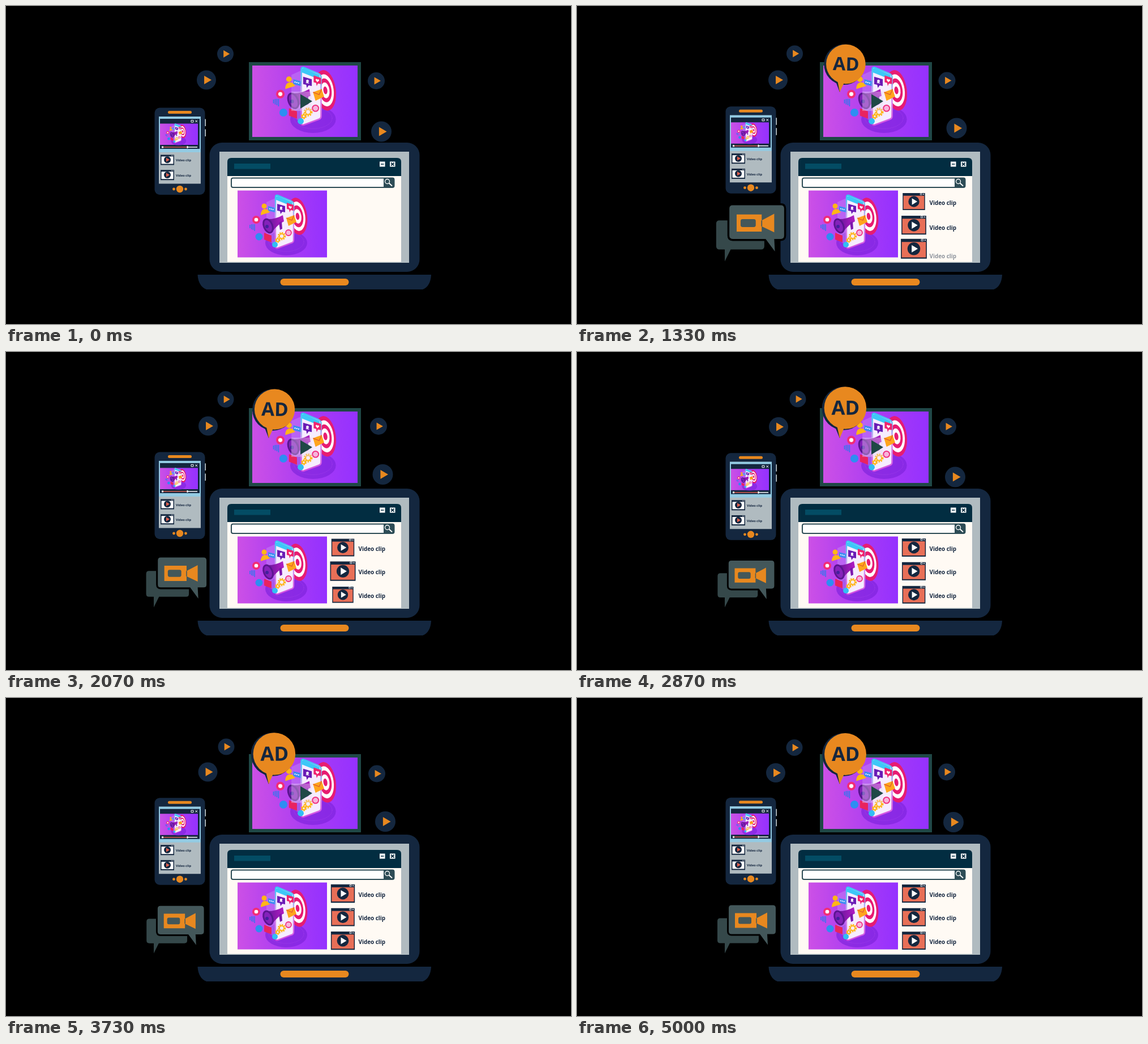
An HTML page for the animation above (5030 ms loop, 998x561 px).

```html
<!DOCTYPE html>
<html lang="en">
<head>
<meta charset="utf-8">
<title>Video advertising</title>
<style>
html, body { margin: 0; width: 100%; height: 100%; overflow: hidden; background: #000; }
svg { display: block; width: 100%; height: 100%; }
text { font-family: "Open Sans", "Noto Sans", sans-serif; font-weight: 700; fill: #14263f; }
.navy { fill: #14273f; }
.orange { fill: #e8881f; }
.gray { fill: #b0bbc0; }
</style>
</head>
<body>
<svg viewBox="0 0 998 561">
  <defs>
    <linearGradient id="violet"><stop stop-color="#cc50e6"/><stop offset=".5" stop-color="#ab3df2"/><stop offset="1" stop-color="#9531ff"/></linearGradient>
    <linearGradient id="cyanPink" x2="0" y2="1"><stop stop-color="#35c5f6"/><stop offset=".45" stop-color="#d6a6f2"/><stop offset="1" stop-color="#d44de0"/></linearGradient>
    <linearGradient id="horn" x2="1"><stop stop-color="#5d1696"/><stop offset="1" stop-color="#b41cc4"/></linearGradient>

    <g id="art">
      <ellipse cx="495" cy="418" rx="37" ry="22" fill="#7d22dc" opacity=".65"/>
      <ellipse cx="495" cy="416" rx="31" ry="17" fill="none" stroke="#b04cf0" stroke-width=".7" stroke-dasharray="1 1.5"/>
      <g id="rings" transform="translate(515 371) rotate(-8)"></g>
      <path d="M460 346L478 338V424L460 412Z" fill="#c48cf5" opacity=".45"/>
      <path d="M476 337q0-4 4-3l24 10q4 2 4 6v63q0 4-4 5l-24 9q-4 1-4-3z" fill="#f6ecff" stroke="url(#cyanPink)" stroke-width="2.4"/>
      <path d="M477 336l3-1 25 11 2 8-30-12z" fill="#3cc8f7"/>
      <path d="M479 349l14 4v11l-5-1-3 4-1-5-5-1z" fill="#6a1bb5"/>
      <circle cx="486" cy="356" r="2.2" fill="#fff"/>
      <path d="M483 359q3-3 6 1z" fill="#fff"/>
      <path d="M496 347l12 4v10l-5-1-2 4-1-5-4-1z" fill="#f0246f"/>
      <path d="M502 358l-3-4q2-3 3 0 2-2 3 1z" fill="#fff"/>
      <g fill="#ffb617">
        <circle cx="456" cy="353" r="4.5"/>
        <path d="M450 369q0-10 7-11 6 0 9 6z"/>
      </g>
      <path d="M463 353l12 3v8l-12-3z" fill="#3d8cf2"/>
      <path d="M465 357.5l8 2" stroke="#fff" stroke-width="1.8" stroke-dasharray="1.8 1.2"/>
      <path d="M495 374l14-5 4 12-14 7z" fill="#ffa51d"/>
      <path d="M495 374l10 4 4-9" fill="none" stroke="#e05b2f" stroke-width="1.2"/>
      <path d="M459 376Q475 377 489 369l2 11q-10 4-23 21z" fill="url(#horn)"/>
      <path d="M482 382l5-2 1 13-4 2z" fill="#7d17ad"/>
      <ellipse cx="463" cy="388" rx="9" ry="14" transform="rotate(-22 463 388)" fill="#5a1590"/>
      <ellipse cx="463" cy="388" rx="6" ry="11" transform="rotate(-22 463 388)" fill="#8421bb"/>
      <circle cx="461" cy="389" r="3" fill="#43209d"/>
      <g fill="none" stroke="#ffb617" stroke-dasharray="2.2 1.4">
        <circle cx="487" cy="406" r="5.5" stroke-width="3.4"/>
        <circle cx="480" cy="413" r="3.4" stroke-width="2.6"/>
      </g>
      <g fill="none" stroke="#ffb617" stroke-width="1.8"><circle cx="487" cy="406" r="4"/><circle cx="480" cy="413" r="2.4"/></g>
      <circle cx="499" cy="400" r="5" fill="#f7b4dc" stroke="#f0307f" stroke-width="1.8"/>
      <circle cx="442" cy="377" r="7" fill="#f22d75"/>
      <circle cx="442" cy="377" r="3.3" fill="#fff"/>
      <path d="M431 386v6m2.7-7v9m2.7-9v10m2.7-10v12" stroke="#2c78ee" stroke-width="1.5"/>
      <circle cx="447" cy="407" r="6.5" fill="#2d8ef2"/>
      <path d="M456 400l13 5v12l-13-5z" fill="#e9235f"/>
      <circle cx="475" cy="421" r="5" fill="#32bdf3"/>
    </g>

    <g id="clip">
      <path class="navy" d="M-21-16h42v32h-42z"/>
      <path d="M-19.5-11h39v25h-39z" fill="#e86f57"/>
      <path d="M12-15.2h3v2.6h-3zM17-15l2.4 2.4m0-2.4l-2.4 2.4" fill="none" stroke="#fff" stroke-width=".8"/>
      <circle class="navy" r="10.3"/>
      <path d="M-3.5-6L6.5 0-3.5 6z" fill="#fff"/>
    </g>

    <g id="row">
      <path class="navy" d="M273 262.500h24v18h-24z"/>
      <path d="M274.500 265.500h21v13h-21z" fill="#fff"/>
      <path d="M292 264h1.300m1.200 0h1.300" stroke="#fff"/>
      <circle class="navy" cx="285" cy="271.300" r="6"/>
      <path d="M283 267.800l6 3.500-6 3.500z" fill="#e2604e"/>
      <text x="300" y="274.500" font-size="5.6">Video clip</text>
    </g>
  </defs>

  <rect width="998" height="561"/>

  <!-- framed video -->
  <path d="M429 99h198v138H429z" fill="#1f4846"/>
  <path d="M435 105h186v126H435z" fill="url(#violet)"/>
  <use href="#art" transform="translate(490 188) scale(1.09) translate(-447 -407)"/>
  <path d="M504 151h36v34h-36z" fill="#e5d5ef" opacity=".38"/>
  <path d="M520 155.500L541 168 520 181z" fill="#1f4846"/>

  <!-- laptop -->
  <rect class="navy" x="359.500" y="241" width="371" height="228" rx="22"/>
  <path class="gray" d="M377 257h335v196H377z"/>
  <path d="M391 299h307v152.500H391z" fill="#fffaf4"/>
  <path d="M391 300v-25q0-7 7-7h293q7 0 7 7v25z" fill="#022d41"/>
  <path d="M403 278h64v9.500h-64z" fill="#034c64"/>
  <path d="M660 274.500h9.500v9H660zM678 274.500h9.500v9H678z" fill="#fff"/>
  <path d="M662 279h5.500M680 276.500l5.500 5m0-5l-5.500 5" stroke="#022d41" stroke-width="1.7"/>
  <rect x="398" y="303.500" width="287.500" height="16.500" rx="3" fill="#fff" stroke="#2d4c56" stroke-width="2"/>
  <path d="M667 303h16q3 0 3 3v11q0 3-3 3h-16z" fill="#2d4c56"/>
  <circle cx="673.500" cy="309.500" r="4" fill="none" stroke="#fff" stroke-width="1.3"/>
  <path d="M676.500 312.500l5.500 5" stroke="#fff" stroke-width="1.8"/>
  <path d="M409 325.500h158v118H409z" fill="url(#violet)"/>
  <use href="#art"/>
  <path class="navy" d="M338.500 474H751C750.500 487 745 497 736 500H354C345 497 339 487 338.500 474z"/>
  <rect class="orange" x="484.500" y="481" width="121" height="12" rx="6"/>
  <g id="list"></g>

  <!-- phone -->
  <g id="phone">
    <path d="M350 199.500h3v12.500h-3zm0 18h3v12.500h-3z" fill="#cbd3d5"/>
    <rect class="navy" x="262.500" y="179.500" width="89" height="153.500" rx="9"/>
    <rect class="orange" x="286" y="185" width="42" height="5" rx="2.500"/>
    <path class="gray" d="M270 195h74v118.500h-74z"/>
    <path d="M270 195h74v63h-74z" fill="#93cbe3"/>
    <path class="navy" d="M272 199h70v53h-70z"/>
    <path d="M272 207.500h67v37.500h-67z" fill="url(#violet)"/>
    <use href="#art" transform="translate(281 207.500) scale(.36) translate(-429 -333)"/>
    <path d="M327 201.500h4v3.500h-4zM334.500 201.500l3.500 3.500m0-3.500l-3.500 3.500" fill="none" stroke="#fff"/>
    <path d="M277 249h43" stroke="#d9604d" stroke-width="1.5"/>
    <path d="M320 249h18" stroke="#fff" stroke-width="1.5"/>
    <path d="M275 247.500h3v3h-3zM319.500 247h2v4h-2z" fill="#fff"/>
    <use href="#row"/>
    <use href="#row" y="26.700"/>
    <g class="orange"><circle cx="307" cy="323" r="6.200"/><circle cx="296.500" cy="323" r="2.400"/><circle cx="317.500" cy="323" r="2.400"/></g>
  </g>

  <g id="buttons"></g>

  <!-- AD bubble, origin at the tail tip -->
  <g id="ad">
    <g class="navy"><circle cx="7" cy="-52" r="38"/><path d="M-9-22L0 0l6-18z"/></g>
    <g class="orange"><circle cx="10" cy="-53" r="37"/><path d="M-5-23L0 0 8-18z"/></g>
    <text x="10.500" y="-41" font-size="34.500" text-anchor="middle">AD</text>
  </g>

  <!-- chat bubbles, origin at the rear tail tip -->
  <g id="chat">
    <path d="M-8-62H55q5 0 5 5v34q0 5-5 5H9L0 0V-18H-8q-5 0-5-5V-57q0-5 5-5z" fill="#35484a"/>
    <path d="M12-85H85q5 0 5 5v41q0 5-5 5H75L76-15 62-34H12q-5 0-5-5V-80q0-5 5-5z" fill="#43575a" stroke="#000" stroke-width="6" paint-order="stroke"/>
    <path class="orange" d="M18-71H56v9L75-72v28L56-53v8H18z"/>
    <path d="M56-62v9" stroke="#43575a" stroke-width="1.500"/>
    <rect x="24" y="-64" width="23" height="12" rx="3" fill="#43575a"/>
  </g>
</svg>
<script>
const LOOP = 5030;
const $ = id => document.getElementById(id);

function add(parent, tag, attrs, label = "") {
  const node = document.createElementNS("http://www.w3.org/2000/svg", tag);
  for (const key in attrs) node.setAttribute(key, attrs[key]);
  node.textContent = label;
  return parent.appendChild(node);
}

const place = (node, x, y, scale = 1, angle = 0) =>
  node.setAttribute("transform", `translate(${x} ${y}) rotate(${angle}) scale(${scale})`);

const clamp = v => Math.max(0, Math.min(1, v));

// Linear growth followed by a decaying overshoot.
function spring(age) {
  const rise = 330;
  if (age <= 0) return 0;
  if (age < rise) return age / rise;
  const t = age - rise;
  return 1 + .26 * Math.exp(-t / 970) * Math.sin(2 * Math.PI * t / 1000);
}

// Smooth drift through a few positions.
const times = [0, 730, 1330, 2070, 2870, 3730, 5000];
function drift(values, t) {
  const last = times.length - 1;
  let i = 0;
  while (i < last - 1 && t > times[i + 1]) i++;
  const slope = k => {
    const a = Math.max(0, k - 1), b = Math.min(last, k + 1);
    return (values[b] - values[a]) / (times[b] - times[a]);
  };
  const span = times[i + 1] - times[i];
  const u = clamp((t - times[i]) / span), v = 1 - u;
  return v * v * (1 + 2 * u) * values[i] + u * u * (3 - 2 * u) * values[i + 1]
    + span * u * v * (v * slope(i) - u * slope(i + 1));
}

[1, .79, .59, .39, .19].forEach((k, i) =>
  add($("rings"), "ellipse", { rx: 17 * k, ry: 33 * k, fill: i % 2 ? "#fff" : "#e71c72" }));

const phoneY = [0, -3.7, -2.3, -3, -1.2, -3.3, -3.8];

const buttons = [
  { r: 14.5, x: [387.5, 383, 384.5, 388, 390, 389, 384], y: [84.5, 83.5, 84, 83.5, 83, 86, 87.5] },
  { r: 17, x: [354, 353, 355, 357, 356, 356.5, 351], y: [130.5, 131.5, 130.5, 130.5, 132, 130.5, 132] },
  { r: 15, x: [654, 652.5, 653.5, 658, 655, 655, 653], y: [132, 134, 131.5, 131, 131.5, 133.5, 130.5] },
  { r: 18, x: [663, 665.5, 670.5, 665.5, 668, 670, 665], y: [221.5, 216.5, 215.5, 216, 220.5, 218, 219] }
];
for (const b of buttons) {
  b.node = add($("buttons"), "g");
  add(b.node, "circle", { r: b.r, class: "navy" });
  add(b.node, "path", { d: "M-.23-.44L.53 0-.23 .44z", class: "orange", transform: `scale(${b.r})` });
}

const items = [
  { y: 345, start: 100, textStart: 310 },
  { y: 386.7, start: 542, textStart: 830 },
  { y: 428.2, start: 940, textStart: 1110 }
];
for (const item of items) {
  item.thumb = add($("list"), "use", { href: "#clip" });
  item.label = add($("list"), "text", { x: 622.5, "font-size": 9.9 }, "Video clip");
}

function render(t) {
  place($("phone"), 0, drift(phoneY, t));
  for (const b of buttons) place(b.node, drift(b.x, t), drift(b.y, t));
  for (const item of items) {
    place(item.thumb, 595, item.y, spring(t - item.start));
    const u = clamp((t - item.textStart) / 600);
    item.label.setAttribute("y", item.y + 5.7 + 17 * (1 - u));
    item.label.setAttribute("opacity", clamp(u * 1.3));
  }
  const size = spring(t - 100);
  place($("ad"), 464, 152, size, 28 * (1 - size));
  place($("chat"), 261, 450.5, spring(t - 675));
}

const began = performance.now();
function tick() {
  render((performance.now() - began) % LOOP);
  requestAnimationFrame(tick);
}
render(0);
requestAnimationFrame(tick);
</script>
</body>
</html>
```
